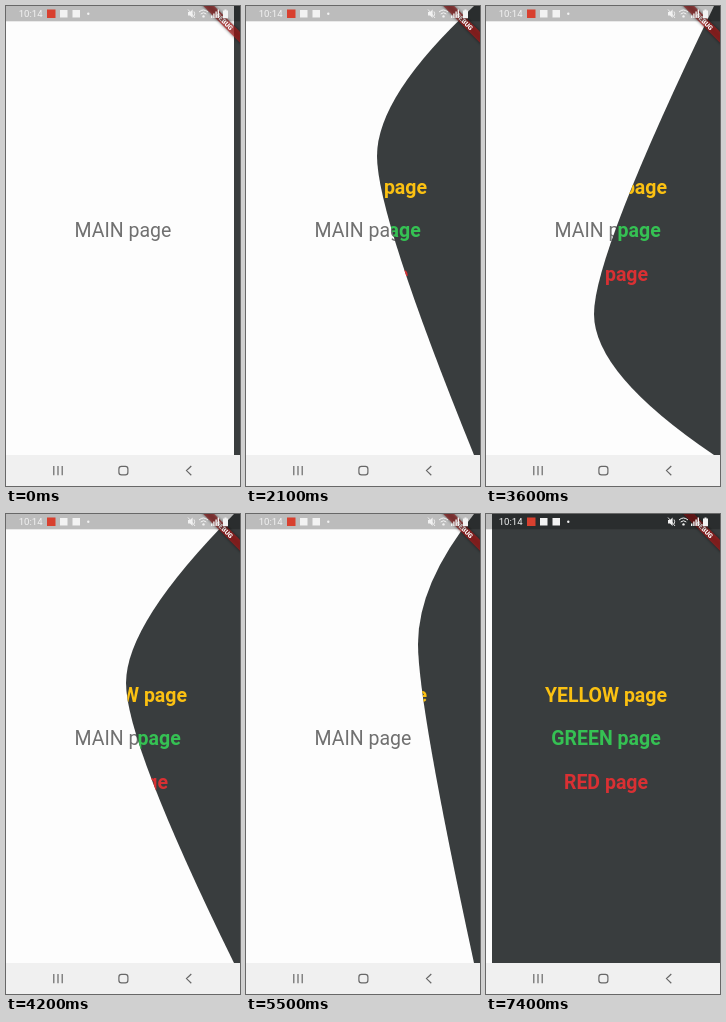
An HTML page that plays this animation: 234 by 480 pixels, repeating every 8000 ms.

```html
<!DOCTYPE html>
<html lang="en">
<head>
<meta charset="utf-8">
<title>Curved drawer</title>
<style>
  html, body { margin: 0; height: 100%; overflow: hidden; background: #fdfdfd; }
  svg { display: block; width: 100%; height: 100%; }
  text { font: 19.5px Roboto, sans-serif; text-anchor: middle; }
  .menu text { font-weight: 700; }
  .menu .bar { fill: #393d3e; }
  .line { fill: none; stroke: #686868; stroke-width: 1.2; }
  .status { fill: #f2f2f2; }
  .status text { font-size: 9.6px; text-anchor: start; }
  .banner text { font-size: 6.6px; font-weight: 900; fill: #fff; }
</style>
</head>
<body>
<svg viewBox="0 0 234 480">
  <defs>
    <clipPath id="drawer"><path id="edge"/></clipPath>
    <filter id="blur" x="-20%" y="-100%" width="140%" height="300%"><feGaussianBlur stdDeviation="1.5"/></filter>
  </defs>

  <rect width="234" height="449" fill="#fdfdfd"/>
  <text x="117" y="231.2" fill="#707070">MAIN page</text>

  <g class="menu" clip-path="url(#drawer)">
    <rect class="bar" width="234" height="449"/>
    <text x="120" y="187.7" fill="#fbc112">YELLOW page</text>
    <text x="120" y="231.2" fill="#35c153">GREEN page</text>
    <text x="120" y="274.7" fill="#d93033">RED page</text>
  </g>

  <g class="banner" transform="translate(234 0) rotate(45)">
    <rect x="-30" y="18.2" width="60" height="7.8" opacity=".5" filter="url(#blur)"/>
    <rect x="-30" y="18.2" width="60" height="7.8" fill="#b71c1c" opacity=".63"/>
    <text y="24.4">DEBUG</text>
  </g>

  <rect width="234" height="15.3" opacity=".26"/>
  <g class="status">
    <text x="12.7" y="11.2">10:14</text>
    <rect x="41" y="3.5" width="8.5" height="8.5" fill="#d8402f"/>
    <rect x="54" y="4" width="7.5" height="7.5"/>
    <rect x="66.5" y="4" width="7.5" height="7.5"/>
    <circle cx="82.3" cy="7.8" r="1.2"/>
    <path d="M182 6h2l2.6-2.4v8.4L184 9.6h-2z"/>
    <path d="M182 3.5l7 8.5M188 5.5q1.4 2.2 0 4.5" fill="none" stroke="#f2f2f2" stroke-width=".9"/>
    <path d="M193 6q4.5-4 9 0M194.7 8q2.8-2.5 5.6 0" fill="none" stroke="#f2f2f2" stroke-width="1"/>
    <circle cx="197.5" cy="10.4" r="1.2"/>
    <path d="M205 12h1.4V9.5H205zm2.2 0h1.4V7.6h-1.4zm2.2 0h1.4V5.5h-1.4zm2.2 0h1.4V3.5h-1.4z"/>
    <path d="M217 4.5h1.5v-1h2v1h1.5v7.7h-5z"/>
  </g>

  <rect y="449" width="234" height="31" fill="#f0f0f0"/>
  <path class="line" d="M47.8 460v9.3M52 460v9.3M56.2 460v9.3M185.3 460l-4.8 4.6 4.8 4.6"/>
  <rect class="line" x="112.9" y="460.3" width="9" height="8.6" rx="2.6"/>
</svg>
<script>
const LOOP = 8000, STEP = 100, HEIGHT = 449, RIGHT = 234;
const CLOSED = 228, OPEN = 6, BEND = 60;

// Finger path: time, x, y
const drag = [
  [1700, 228, 190], [1900, 190, 165], [2100, 131, 150], [2350, 44, 200],
  [2600, 94, 270], [3100, 185, 325], [3600, 108, 308], [3900, 66, 250],
  [4300, 130, 150], [4800, 75, 130], [5000, 45, 170], [5250, 120, 160],
  [5500, 172, 130], [5900, 45, 190], [6200, 90, 205], [6400, 71, 171],
  [6700, 25, 180], [7000, 6, 190]
];
const edge = document.getElementById('edge');

const slope = (i, k) => {
  const a = drag[i - 1], b = drag[i + 1];
  return a && b ? (b[k] - a[k]) / (b[0] - a[0]) : 0;
};

// Smooth curve through the finger path; k selects x or y
function along(t, k) {
  const last = drag.length - 1;
  if (t <= drag[0][0]) return drag[0][k];
  if (t >= drag[last][0]) return drag[last][k];
  const i = drag.findIndex(p => p[0] > t) - 1;
  const a = drag[i], b = drag[i + 1], span = b[0] - a[0];
  const u = (t - a[0]) / span, v = 1 - u;
  return v * v * (1 + 2 * u) * a[k] + u * u * (3 - 2 * u) * b[k]
    + u * v * span * (v * slope(i, k) - u * slope(i + 1, k));
}

function render(t) {
  const u = Math.min(1, Math.max(0, (t - 6400) / 600));
  const base = CLOSED + (OPEN - CLOSED) * u * u * (3 - 2 * u);
  const x = Math.min(base, Math.max(OPEN, along(t, 1))), y = along(t, 2);
  edge.setAttribute('d', `M${RIGHT} 0H${base}Q${x} ${y - BEND} ${x} ${y}` +
    `Q${x} ${y + BEND} ${base} ${HEIGHT}H${RIGHT}Z`);
}

const start = performance.now();
function tick() {
  const t = (performance.now() - start) % LOOP;
  render(Math.floor(t / STEP) * STEP);
  requestAnimationFrame(tick);
}
tick();
</script>
</body>
</html>
```
